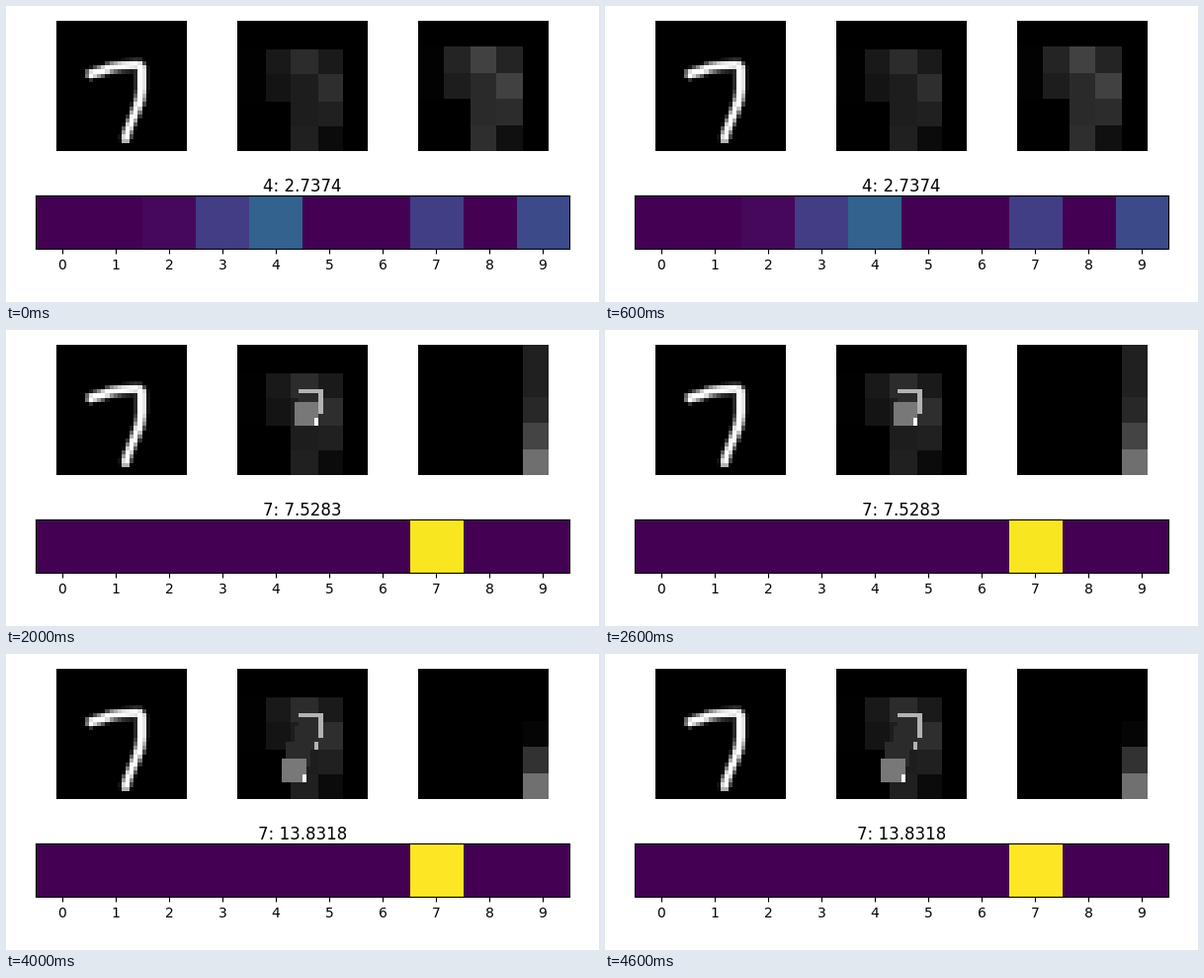
A matplotlib script for the animation above (5000 ms loop, 600 by 300 pixels).

```python
import numpy as np
import matplotlib.pyplot as plt
from matplotlib.animation import FuncAnimation

SIZE, PATCH, CELLS = 32, 6, 5

# Pen path of the digit, in cell coordinates
PATH = [(8, 12.6), (10.5, 11.9), (13, 11), (15.5, 10.6), (19.6, 10.4),
        (20.45, 11.3), (20.45, 16.5), (20.05, 18.8), (18.5, 23),
        (17.1, 26.5), (16.5, 28.4)]

# Patch corner (column, row), title, and the classes that stand out
STEPS = [
    (None, "4: 2.7374", {2: .02, 3: .183, 4: .313, 7: .187, 9: .226}),
    ((15, 11), "7: 5.0562", {4: .17, 7: .78, 9: .03}),
    ((14, 14), "7: 7.5283", {7: .99}),
    ((12, 18), "7: 10.6422", {7: 1}),
    ((11, 22), "7: 13.8318", {7: 1}),
]


def draw_digit():
    y, x = np.mgrid[:SIZE, :SIZE].astype(float)
    dist = np.full((SIZE, SIZE), np.inf)
    for (x0, y0), (x1, y1) in zip(PATH, PATH[1:]):
        dx, dy = x1 - x0, y1 - y0
        t = np.clip(((x - x0) * dx + (y - y0) * dy) / (dx**2 + dy**2), 0, 1)
        dist = np.minimum(dist, np.hypot(x - x0 - t * dx, y - y0 - t * dy))
    return np.clip(1.35 - .82 * dist, 0, 1)


def shrink(img):
    """Resample a square image to CELLS x CELLS with a triangle filter."""
    scale = len(img) / CELLS
    centers = (np.arange(CELLS)[:, None] + .5) * scale
    gaps = np.abs(centers - np.arange(len(img)) - .5)
    weights = np.clip(1 - gaps / scale, 0, None)
    weights /= weights.sum(axis=1, keepdims=True)
    return weights @ img @ weights.T


def window(step):
    corner = STEPS[step][0]
    if corner is None:
        return np.s_[:, :]
    col, row = corner
    return np.s_[row:row + PATCH, col:col + PATCH]


def draw_glimpse(step):
    return shrink(digit[window(step)])


def draw_trail(step):
    """Faded memory of all glimpses, with the current patch lit up."""
    nearest = np.arange(SIZE) * CELLS // SIZE
    canvas = .7 * draw_glimpse(0)[np.ix_(nearest, nearest)]
    for k in range(1, step + 1):
        area = window(k)
        glow = .3 if k == step else 0
        canvas[area] = np.where(digit[area] > .3, .7, .17) + glow
    return canvas


def draw_bar(step):
    row = np.zeros((1, 10))
    for label, score in STEPS[step][2].items():
        row[0, label] = score
    return row


digit = draw_digit()
fig = plt.figure(figsize=(6, 3), dpi=100)
# The tiny offset keeps tick labels off a half-pixel rounding edge
grid = fig.add_gridspec(2, 3, left=.05 - 1e-6, right=.95, bottom=.05,
                        top=.95, wspace=.05, hspace=.05)


def show(cell, data, cmap):
    ax = fig.add_subplot(cell)
    return ax, ax.imshow(data, cmap=cmap, vmin=0, vmax=1,
                         interpolation="nearest")


panels = [show(grid[0, col], data, "gray") for col, data in
          enumerate([digit, draw_trail(0), draw_glimpse(0)])]
for ax, _ in panels:
    ax.axis("off")
trail, glimpse = panels[1][1], panels[2][1]

bar_ax, bar = show(grid[1, :], draw_bar(0), "viridis")
bar_ax.set_xticks(range(10))
bar_ax.set_yticks([])
title = bar_ax.set_title(STEPS[0][1], fontsize=12, pad=1.28)


def update(step):
    trail.set_data(draw_trail(step))
    glimpse.set_data(draw_glimpse(step))
    bar.set_data(draw_bar(step))
    title.set_text(STEPS[step][1])
    return trail, glimpse, bar, title


anim = FuncAnimation(fig, update, frames=len(STEPS), interval=1000,
                     repeat=True, repeat_delay=0)
plt.show()
```
